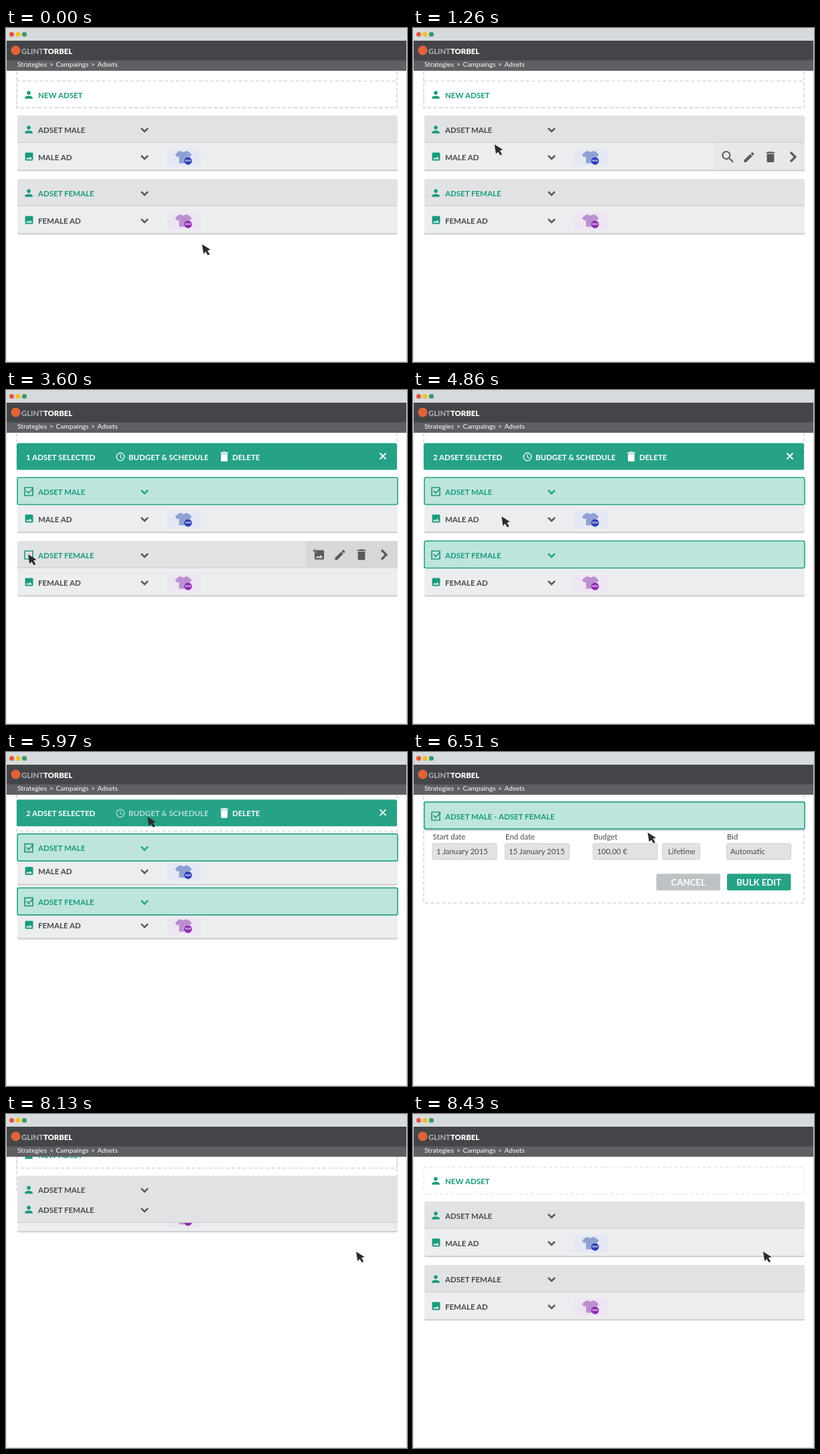
An HTML page that plays this animation: 599x500 px, repeating every 8.97 s.

```html
<!DOCTYPE html>
<html lang="en">
<head>
<meta charset="utf-8">
<title>Bulk edit demo</title>
<style>
html, body { margin: 0; width: 100%; height: 100%; overflow: hidden; background: #fff; }
svg { display: block; width: 100vw; height: 100vh; font-family: Lato, sans-serif; }
.b { font-weight: 700; font-size: 11.5px; }
.r { font-size: 11.4px; fill: #48494b; }
.crumb { font-size: 10.2px; fill: #fff; }
.dash { fill: none; stroke: #dfdfdf; stroke-width: 2; stroke-dasharray: 5 3.5; }
.dash.thin { stroke-width: 1; }
.line { fill: none; stroke: #58595b; stroke-width: 2.5; }
.dark { fill: #58595b; }
.green { fill: #189a7e; }
.label { fill: #48494b; }
.bg { fill: #e1e2e3; }
.box { fill: none; stroke: #26997f; stroke-width: 1.7; }
.panel, .box, .tick { display: none; }
.hover .panel { display: inline; }
.adset.hover .box, .adset.sel .box { display: inline; }
.adset.hover .person, .adset.sel .person { display: none; }
.sel .tick { display: inline; }
.lit .label, .sel .label { fill: #189a7e; }
.sel .bg { fill: #bde5dc; stroke: #26a287; stroke-width: 1.6; }
.sel .line { stroke: #26a287; }
.sel .rule { display: none; }
</style>
</head>
<body>
<script>
const LOOP = 8970, GREEN = '#26a287';

const ICON = {
  person: 'M12 12c2.2 0 4-1.8 4-4s-1.8-4-4-4-4 1.8-4 4 1.8 4 4 4zm0 2c-2.7 0-8 1.3-8 4v2h16v-2c0-2.7-5.3-4-8-4z',
  image: 'M21 19V5c0-1.1-.9-2-2-2H5c-1.1 0-2 .9-2 2v14c0 1.1.9 2 2 2h14c1.1 0 2-.9 2-2zM8.5 13.5l2.5 3 3.5-4.5 4.5 6H5z',
  search: 'M15.5 14h-.8l-.3-.3A6.5 6.5 0 1 0 9.5 16c1.6 0 3.1-.6 4.2-1.6l.3.3v.8l5 5 1.5-1.5zm-6 0a4.5 4.5 0 1 1 0-9 4.5 4.5 0 0 1 0 9z',
  pencil: 'M3 17.2V21h3.8L17.8 9.9l-3.7-3.7zM20.7 7c.4-.4.4-1 0-1.4l-2.3-2.3c-.4-.4-1-.4-1.4 0l-1.9 1.8 3.8 3.8z',
  trash: 'M6 19c0 1.1.9 2 2 2h8c1.1 0 2-.9 2-2V7H6zM19 4h-3.5l-1-1h-5l-1 1H5v2h14z'
};

const icon = (name, cx, cy, s, cls) =>
  `<path class="${cls}" d="${ICON[name]}" transform="translate(${cx - 12 * s} ${cy - 12 * s}) scale(${s})"/>`;
const rect = (x, y, w, h, rest = '') => `<rect x="${x}" y="${y}" width="${w}" height="${h}" ${rest}/>`;
const text = (x, y, cls, str, rest = '') => `<text x="${x}" y="${y}" class="${cls}" ${rest}>${str}</text>`;
const chevron = y => `<path class="line" d="M202 ${y - 2.5}l5 5 5-5"/>`;

const tools = (x, y) =>
  icon('pencil', x + 32, y + .5, .84, 'dark') + icon('trash', x + 64, y, .9, 'dark') +
  `<path class="line" style="stroke:#58595b;stroke-width:3.2" d="M${x + 94} ${y - 7}l7 7-7 7"/>`;

const checkbox = y =>
  `<path class="box" d="M28 ${y - 6}h12v12h-12z"/>` +
  `<path class="tick" fill="none" stroke="#26997f" stroke-width="1.8" d="M30.5 ${y - 1}l3.3 3.3 7-7.3"/>`;

function adset(id, y, name) {
  const c = y + 21;
  return `<g id="${id}" class="adset">` +
    rect(17, y, 568, 40.5, 'rx="2.5" class="bg"') +
    rect(17, y + 39.5, 568, 1.3, 'fill="#cfd0d1" class="rule"') +
    `<g class="panel">${rect(448, y, 137, 40, 'fill="#d6d7d8"')}` +
    icon('image', 468, c - .2, .78, 'dark') +
    `<path d="M460 ${c - 10}v7m-3.5-3.5h7" stroke="#d6d7d8" stroke-width="5"/>` +
    `<path d="M461.5 ${c - 9}v6m-3-3h6" stroke="#58595b" stroke-width="1.5"/>${tools(467, c - .5)}</g>` +
    icon('person', 34, c, .72, 'green person') + checkbox(c) +
    text(48, c + 4.7, 'b label', name) + chevron(c + .5) + '</g>';
}

function ad(id, y, name, tile, shirt, badge) {
  const c = y + 21;
  return `<g id="${id}">` +
    rect(17, y + 5, 568, 37.3, 'rx="2.5" fill="#cbcccd"') +
    rect(17, y, 568, 40.3, 'rx="2" fill="#ecedee"') +
    `<g class="panel">${rect(450, y, 135, 40, 'fill="#e7e8e9"')}` +
    icon('search', 470.5, c, 1, 'dark') + tools(470, c) + '</g>' +
    icon('image', 34.5, c - .5, .66, 'green') + text(48, c + 4.7, 'b label', name) + chevron(c + .5) +
    rect(241, c - 12, 50, 26, `fill="${tile}"`) +
    `<path fill="${shirt}" d="M261 ${c - 9}q4 3.500 8 0l3.500 1 5 4.500-3 4-3-1.500v10.500h-13v-10.500l-3 1.500-3-4 5-4.500z"/>` +
    `<circle cx="272" cy="${c + 6}" r="5.7" fill="${badge}"/>` +
    text(272, c + 7.2, '', 'NEW', 'font-size="3.6" font-weight="700" fill="#fff" text-anchor="middle"') + '</g>';
}

const field = (x, w, str, dx = 6) =>
  rect(x, 137, w, 24, 'rx="2" fill="#e1e2e3" stroke="#cdcfd1"') + text(x + dx, 153, 'r', str);
const button = (x, str, fill) =>
  rect(x, 182.3, 95.5, 25, `rx="2.5" fill="${fill}"`) +
  text(x + 47.7, 199.5, '', str, 'font-size="13.2" font-weight="700" fill="#fff" text-anchor="middle"');

const form =
  `<rect id="frame" class="dash" x="16" y="46" width="568" height="73"/>` +
  `<g clip-path="url(#fold)"><g id="fields">` +
  [[29.5, 'Start date'], [138, 'End date'], [269.5, 'Budget'], [469, 'Bid']]
    .map(([x, s]) => text(x, 130.7, 'r', s)).join('') +
  field(29, 96, '1 January 2015') + field(137.5, 96, '15 January 2015', 5.5) +
  field(269, 96, '100,00 €') + field(372.5, 56, 'Lifetime', 8.5) + field(468.5, 96, 'Automatic', 5.5) +
  button(363.5, 'CANCEL', '#bec2c5') + button(469, 'BULK EDIT', GREEN) + '</g></g>';

const toolbar =
  `<g id="fresh"><rect id="freshBox" class="dash" x="16" y="79.500" width="568" height="40"/>` +
  icon('person', 34, 100, .72, 'green') + text(48, 104.7, 'b green', 'NEW ADSET') + '</g>' +
  `<g id="bar" fill="#fff">${rect(16, 79.5, 568, 40, `rx="2.5" fill="${GREEN}"`)}` +
  `<text id="count" class="b" x="30" y="104.700"></text>` +
  `<g id="budget"><circle cx="171" cy="100" r="5.800" fill="none" stroke="#fff" stroke-width="1.300"/>` +
  `<path d="M171 96.500v4l2.800 1.700" fill="none" stroke="#fff" stroke-width="1.200"/>` +
  text(183, 104.7, 'b', 'BUDGET &amp; SCHEDULE') + '</g>' +
  icon('trash', 326, 99.7, .82, '') + text(338, 104.7, 'b', 'DELETE') +
  `<path d="M558.500 94.500l9 9m0-9l-9 9" stroke="#fff" stroke-width="1.800"/></g>`;

const merged =
  `<g id="merged" class="adset sel">${rect(17, 78, 568, 39.5, 'rx="2.5" fill="#b9c4c1"')}` +
  rect(16.8, 75, 568.4, 40, 'rx="2.5" class="bg"') + checkbox(96) +
  text(48, 100.7, 'b label', 'ADSET MALE - ADSET FEMALE') + '</g>';

const chrome =
  rect(0, 0, 599, 20, 'fill="#d7dadd"') +
  [[8.5, '#e4573d'], [18, '#f0c029'], [27.5, '#3a9a62']]
    .map(([x, c]) => `<circle cx="${x}" cy="9.500" r="3.600" fill="${c}"/>`).join('') +
  rect(0, 19, 599, 30, 'fill="#444548"') + rect(0, 48.5, 599, 15.5, 'fill="#5f6063"') +
  `<circle cx="14.500" cy="33.500" r="7" fill="#e0633a"/>` +
  `<text x="23" y="38.500" font-size="11.300" font-weight="700" fill="#b4b5b7">GLINT<tspan fill="#fff" font-weight="900">TORBEL</tspan></text>` +
  [[17, 'Strategies'], [65, '&gt;'], [74.5, 'Campaings'], [127, '&gt;'], [136.5, 'Adsets']]
    .map(([x, s]) => text(x, 58, 'crumb', s)).join('') +
  `<path d="M.5 19V499.500H598.500V19" fill="none" stroke="#d2d4d6"/>`;

document.body.innerHTML =
  `<svg viewBox="0 0 599 500"><defs><clipPath id="fold"><rect id="foldBox" x="0" y="95" width="599" height="0"/></clipPath></defs>` +
  form + toolbar +
  ad('maleAd', 172, 'MALE AD', '#e5e8f4', '#8fa0d3', '#2f3fb5') +
  ad('femaleAd', 267, 'FEMALE AD', '#eee5f3', '#bb8fd0', '#8d2bb1') +
  adset('male', 131, 'ADSET MALE') + adset('female', 226, 'ADSET FEMALE') +
  merged + chrome +
  `<path id="cursor" fill="#2b2b2d" d="M0 0L12.500 8 8 9.300 11.300 14.700 8.700 16.300 5.300 10.900 2.200 14.300z"/></svg>`;

const el = {};
document.querySelectorAll('[id]').forEach(e => el[e.id] = e);

// Cursor legs: start, end, from, control, to
const legs = [
  [0, 1770, [293, 324], [197, 173], [33, 151]],
  [2220, 3600, [33, 151], [33, 198.5], [33, 246]],
  [4080, 5550, [33, 246], [145, 217], [187, 96]],
  [5880, 7230, [187, 96], [368, 97], [523, 206]]
];
const hovers = [
  [145, 425, 'femaleAd'], [425, 930, 'female'], [930, 1450, 'maleAd'],
  [1450, 2220, 'male'], [3180, 4080, 'female']
];

const clamp = u => Math.min(1, Math.max(0, u));
const ease = (t, start, dur) => (1 - Math.cos(Math.PI * clamp((t - start) / dur))) / 2;
const move = (e, x, y) => e.setAttribute('transform', `translate(${x.toFixed(2)} ${y.toFixed(2)})`);
const show = (e, on) => e.style.display = on ? '' : 'none';

function cursorAt(t) {
  const [start, end, a, c, b] = legs.filter(l => t >= l[0]).pop();
  const u = clamp((t - start) / (end - start)), v = 1 - u;
  return [0, 1].map(i => v * v * a[i] + 2 * u * v * c[i] + u * u * b[i]);
}

function draw(t) {
  const back = t >= 7950, settled = t >= 8430;
  const fold = ease(t, 5880, 360) - ease(t, 7950, 480);
  const open = ease(t, 6180, 330) - ease(t, 7530, 420);
  const picked = { male: t >= 2220 && !back, female: t >= 4080 && !back };
  const hover = (hovers.find(h => t >= h[0] && t < h[1]) || [])[2];

  for (const id of ['male', 'female']) {
    const cls = ['adset'];
    if (picked[id]) cls.push('sel');
    else if (hover === id) cls.push('hover', 'lit');
    if (id === 'female' && !back) cls.push('lit');
    el[id].setAttribute('class', cls.join(' '));
    el[id + 'Ad'].setAttribute('class', hover === id + 'Ad' ? 'hover' : '');
    const rise = id === 'male' ? 56 : 151;
    move(el[id], 0, -rise * fold);
    move(el[id + 'Ad'], 0, -(rise + 41) * fold);
    show(el[id + 'Ad'], fold < .999);
  }
  show(el.merged, fold > .999);

  const barOn = picked.male;
  show(el.bar, barOn);
  show(el.fresh, !barOn);
  move(el.bar, 0, -56 * fold);
  move(el.fresh, 0, -56 * fold);
  el.count.textContent = (picked.female ? 2 : 1) + ' ADSET SELECTED';
  el.budget.setAttribute('opacity', t >= 5440 ? .65 : 1);
  el.freshBox.setAttribute('class', settled ? 'dash thin' : 'dash');

  const bottom = 119 - 4 * fold + 111 * open;
  show(el.frame, !settled);
  el.frame.setAttribute('height', bottom - 46);
  el.foldBox.setAttribute('height', Math.max(0, bottom - 95));
  show(el.fields, open > 0);
  move(el.fields, 0, -103 * (1 - open));

  move(el.cursor, ...cursorAt(t));
}

function tick() {
  draw(performance.now() % LOOP);
  requestAnimationFrame(tick);
}
tick();
</script>
</body>
</html>
```
